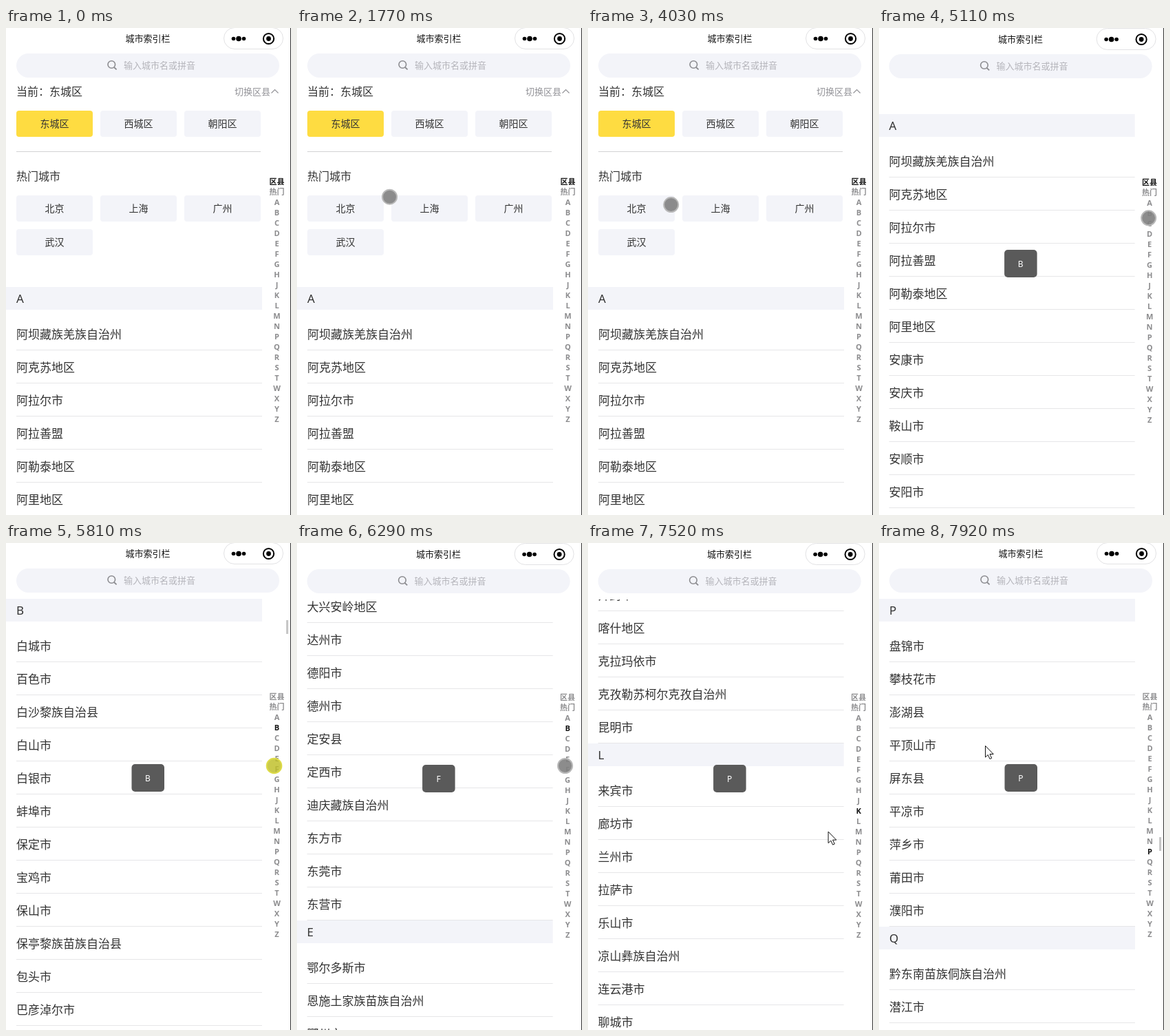
These frames come from a looping animation (414 px wide and 707 px high, 8 s). An HTML page:

```html
<!DOCTYPE html>
<html lang="zh-CN">
<head>
<meta charset="utf-8">
<title>城市索引栏</title>
<style>
html, body { margin: 0; width: 100%; height: 100%; overflow: hidden; background: #fff; }
svg { display: block; width: 414px; height: 707px; }
text { font-family: "Noto Sans", "Noto Sans CJK SC", sans-serif; font-weight: 300; }
</style>
</head>
<body>
<svg id="stage" viewBox="0 0 414 707"></svg>
<script>
const LOOP = 8000, TOP = 81, LIST_Y = 295, ROW = 48, HEAD = 44, FOLD = 49, STEP = 80;
const GRAY = '#f3f4f9', YELLOW = '#fedc41', INK = '#333';
const LETTERS = 'ABCDEFGHJKLMNPQRSTWXYZ';

const CITIES = {
  A: '阿坝藏族羌族自治州 阿克苏地区 阿拉尔 阿拉善盟 阿勒泰地区 阿里地区 安康 安庆 鞍山 安顺 安阳 澳门',
  B: '白城 百色 白沙黎族自治县 白山 白银 蚌埠 保定 宝鸡 保山 保亭黎族苗族自治县 包头 巴彦淖尔 巴音郭楞蒙古自治州 巴中 北海 北京 本溪 毕节 滨州 亳州',
  C: '沧州 长春 常德 昌都 昌吉回族自治州 长沙 长治 常州 朝阳 潮州 承德 成都 澄迈县 郴州 赤峰 池州 重庆 崇左 楚雄彝族自治州 滁州',
  D: '大理白族自治州 大连 丹东 儋州 大庆 大同 大兴安岭地区 达州 德阳 德州 定安县 定西 迪庆藏族自治州 东方 东莞 东营',
  E: '鄂尔多斯 恩施土家族苗族自治州 鄂州',
  F: '防城港 佛山 福州 抚顺 阜新 阜阳 抚州',
  G: '甘南藏族自治州 赣州 甘孜藏族自治州 高雄 广安 广元 广州 贵港 桂林 贵阳 果洛藏族自治州 固原',
  H: '哈尔滨 海北藏族自治州 海东 海口 海南藏族自治州 海西蒙古族藏族自治州 哈密 邯郸 杭州 汉中 鹤壁 河池 合肥 鹤岗 黑河 衡水 衡阳 和田地区 河源 菏泽 贺州 淮安 淮北 怀化 淮南 花莲县 黄冈 黄南藏族自治州 黄山 黄石 呼和浩特 惠州 葫芦岛 呼伦贝尔 湖州',
  J: '佳木斯 江门 焦作 嘉兴 嘉义 嘉峪关 揭阳 吉林 济南 金昌 晋城 景德镇 荆门 荆州 金华 济宁 晋中 锦州 九江 酒泉 鸡西 济源',
  K: '开封 喀什地区 克拉玛依 克孜勒苏柯尔克孜自治州 昆明',
  L: '来宾 廊坊 兰州 拉萨 乐山 凉山彝族自治州 连云港 聊城 辽阳 辽源 丽江 临沧 临汾 临高县 临夏回族自治州 临沂 林芝 丽水 六安 六盘水 柳州 陇南 龙岩 娄底 漯河 洛阳 泸州 吕梁',
  M: '马鞍山 茂名 眉山 梅州 绵阳 苗栗县 牡丹江',
  N: '南昌 南充 南京 南宁 南平 南通 南阳 那曲 内江 宁波 宁德',
  P: '盘锦 攀枝花 澎湖县 平顶山 屏东县 平凉 萍乡 莆田 濮阳',
  Q: '黔东南苗族侗族自治州 潜江 黔南布依族苗族自治州 钦州 秦皇岛 清远 庆阳'
};

const stage = document.getElementById('stage');

function el(parent, tag, attrs = {}) {
  const node = document.createElementNS('http://www.w3.org/2000/svg', tag);
  for (const k in attrs) node.setAttribute(k, attrs[k]);
  parent.appendChild(node);
  return node;
}
const group = (parent, attrs) => el(parent, 'g', attrs);
const rect = (parent, x, y, width, height, fill, rx = 0) =>
  el(parent, 'rect', { x, y, width, height, fill, rx });
const circle = (parent, cx, cy, r, attrs) => el(parent, 'circle', { cx, cy, r, ...attrs });
// cy is the optical middle of the glyphs
function label(parent, str, x, cy, size, fill = INK, attrs = {}, weight = 300) {
  const node = el(parent, 'text', { x, y: cy + size * 0.37, 'font-size': size, fill, ...attrs });
  node.style.fontWeight = weight;
  node.textContent = str;
  return node;
}
const middle = { 'text-anchor': 'middle' };
function button(parent, str, col, y) {
  const x = 15 + 122 * col, box = rect(parent, x, y, 111, 38, GRAY, 4);
  label(parent, str, x + 55.5, y + 19, 14, INK, middle);
  return box;
}
const show = (node, on) => node.setAttribute('display', on ? 'inline' : 'none');
const move = (node, x, y) => node.setAttribute('transform', `translate(${x} ${y})`);

const defs = el(stage, 'defs');
rect(el(defs, 'clipPath', { id: 'view' }), 0, TOP, 414, 707, '#000');
const glow = el(defs, 'radialGradient', { id: 'press' });
[[0, 0.7], [0.5, 0.6], [1, 0.35]].forEach(([offset, o]) =>
  el(glow, 'stop', { offset, 'stop-color': '#222', 'stop-opacity': o }));

const screen = group(stage);

// Scrolling page
const page = group(group(screen, { 'clip-path': 'url(#view)' }));
label(page, '当前：东城区', 15, 92, 16);
label(page, '切换区县', 332, 92, 13, '#929297');
const chevron = el(page, 'path', { fill: 'none', stroke: '#929297', 'stroke-width': 1.2 });
const districts = group(page);
const choices = ['东城区', '西城区', '朝阳区'].map((s, i) => button(districts, s, i, 120));
const lower = group(page);
rect(lower, 15, 179, 355, 1, '#d2d2d4');
label(lower, '热门城市', 15, 215, 16);
['北京', '上海', '广州', '武汉'].forEach((s, i) => button(lower, s, i % 3, i < 3 ? 243 : 292));

const offset = {};
let y = TOP + LIST_Y;
for (const key in CITIES) {
  offset[key] = y - TOP;
  rect(lower, 0, y, 372, 33, GRAY);
  label(lower, key, 15, y + 17, 17, INK, {}, 400);
  y += HEAD;
  for (const name of CITIES[key].split(' ')) {
    const full = /(县|盟|地区|自治州|澳门)$/.test(name) ? name : name + '市';
    label(lower, full, 15, y + 25, 17);
    rect(lower, 15, y + 47, 357, 1, '#e6e6e8');
    y += ROW;
  }
}

// Fixed header
label(screen, '城市索引栏', 206, 15.5, 13, '#111', middle);
el(screen, 'rect', { x: 316.5, y: -0.5, width: 86, height: 31, rx: 15.5, fill: '#fff', stroke: '#e2e2e4' });
[[330.5, 2.8], [338, 3.8], [345.5, 2.8]].forEach(([x, r]) => circle(screen, x, 15.5, r, { fill: '#000' }));
circle(screen, 381.5, 15.5, 7.6, { fill: 'none', stroke: '#000', 'stroke-width': 2 });
circle(screen, 381.5, 15.5, 3.4, { fill: '#000' });
rect(screen, 15, 37, 382, 35, GRAY, 17.5);
circle(screen, 153.3, 53, 5.3, { fill: 'none', stroke: '#8c8c90', 'stroke-width': 1.6 });
el(screen, 'path', { d: 'M157 57l3.6 3.4', stroke: '#8c8c90', 'stroke-width': 1.8 });
label(screen, '输入城市名或拼音', 171, 54, 13, '#b4b4ba');

// Index column, scroll thumb, toast
const marks = ['区县', '热门', ...LETTERS].map((s, i) =>
  label(screen, s, 393.5, 223 + 15 * i, 11, '#8c8c8e', middle, 700));
const thumb = rect(screen, 407, 0, 3, 20, '#c6c6c6');
const toast = group(screen);
rect(toast, 182.5, 321, 47.5, 40, '#5a5a5a', 5);
const toastText = label(toast, '', 206, 341.5, 12, '#fff', middle, 500);

rect(stage, 413, 0, 1, 707, '#333');

// Pointer looks
const pointer = group(stage);
const looks = {
  hover: circle(pointer, 0, 0, 10.5, { fill: '#808080', 'fill-opacity': 0.9, stroke: '#b8b8b8', 'stroke-width': 2 }),
  press: circle(pointer, 0, 0, 11.5, { fill: 'url(#press)' }),
  click: circle(pointer, 0, 0, 10.8, { fill: '#bebe24', 'fill-opacity': 0.82, stroke: '#dedc48', 'stroke-width': 2 }),
  arrow: el(pointer, 'path', { d: 'M0 0V16.5L3.8 13l2.7 6 2.7-1.2L6.5 12H11.7z', fill: '#fff', stroke: '#111' })
};

// Tracks: [time, ...values]
const path = [
  [440, 286, 15], [800, 262, 190], [1210, 198, 375], [1290, 197, 407], [1450, 180, 380],
  [1770, 134.5, 245.5], [2070, 152, 146], [2200, 172, 142], [2300, 190, 140], [2540, 306.5, 137.5],
  [2640, 316, 136], [2940, 378, 94], [3170, 377, 94], [3320, 374, 93.5], [3490, 373, 93],
  [3640, 373, 93], [4030, 120.5, 256.5], [4200, 150, 270], [4410, 300, 280], [4750, 392, 268],
  [4950, 392, 268], [5400, 391, 290], [5700, 389.5, 323.5], [6360, 389.5, 323.5],
  [6530, 390, 330], [6700, 392, 386], [6800, 392, 386], [7060, 394.5, 410.5],
  [7300, 391, 446], [7450, 391, 446], [7850, 154.5, 294.5], [LOOP, 154.5, 294.5]
];
const scroll = [
  [0, 0], [4950, 0], [5350, offset.B], [5900, offset.B], [6360, offset.F], [6760, offset.F],
  [7060, offset.J - 480], [7300, offset.K], [7450, offset.K], [7800, offset.P], [LOOP, offset.P]
];
const looksAt = [
  [440, 'hover'], [2180, 'press'], [2270, 'hover'], [2460, 'press'], [2620, 'hover'],
  [2960, 'press'], [3100, 'hover'], [3580, 'press'], [3700, 'hover'], [4850, 'click'],
  [5000, 'hover'], [5770, 'click'], [5950, 'hover'], [6700, 'click'], [6820, 'arrow']
];
const toasts = [[4900, 'B'], [5870, 'F'], [6740, 'K'], [7430, 'P']];
const actives = [[0, '区县'], [5350, 'B'], [6360, 'F'], [7300, 'K'], [7800, 'P']];

function sample(track, t) {
  let i = track.findIndex(k => k[0] > t);
  if (i < 0) i = track.length - 1;
  i = Math.max(i, 1);
  const a = track[i - 1], b = track[i];
  const p = Math.min(1, Math.max(0, (t - a[0]) / (b[0] - a[0])));
  return a.slice(1).map((v, n) => v + (b[n + 1] - v) * p);
}
function state(track, t) {
  let now = null;
  for (const [start, value] of track) if (t >= start) now = value;
  return now;
}

function draw(t) {
  const folded = t >= 3020 && t < 3640;
  // the list advances in visible steps
  const beat = Math.max(0, Math.floor((t - 20) / STEP) * STEP + 20);
  const [top] = sample(scroll, beat);
  const scrolling = sample(scroll, beat + 1)[0] !== top;

  // the whole picture slips a pixel while the list runs
  move(screen, scrolling ? -0.4 : 0, scrolling ? 1 : 0);
  move(page, 0, -Math.round(top));
  move(lower, 0, folded ? -FOLD : 0);
  show(districts, !folded);
  chevron.setAttribute('d', folded ? 'M385.5 89.5l5 5 5-5' : 'M385.5 94.5l5-5 5 5');
  choices[0].setAttribute('fill', YELLOW);
  choices[1].setAttribute('fill', t >= 2200 && t < 3020 ? YELLOW : GRAY);
  choices[2].setAttribute('fill', t >= 2500 && t < 3020 ? YELLOW : GRAY);

  const active = state(actives, t);
  marks.forEach(m => m.setAttribute('fill', m.textContent === active ? '#111' : '#8c8c8e'));

  const rested = actives.some(([start]) => start > 0 && t >= start && t < start + 700);
  show(thumb, rested && !scrolling);
  thumb.setAttribute('y', Math.round(TOP + top * 0.03335));

  const message = state(toasts, t);
  show(toast, message);
  toastText.textContent = message || '';

  const look = state(looksAt, t);
  for (const k in looks) show(looks[k], k === look);
  move(pointer, ...sample(path, t));
}

function tick(now) {
  draw(now % LOOP);
  requestAnimationFrame(tick);
}
draw(0);
requestAnimationFrame(tick);
</script>
</body>
</html>
```
